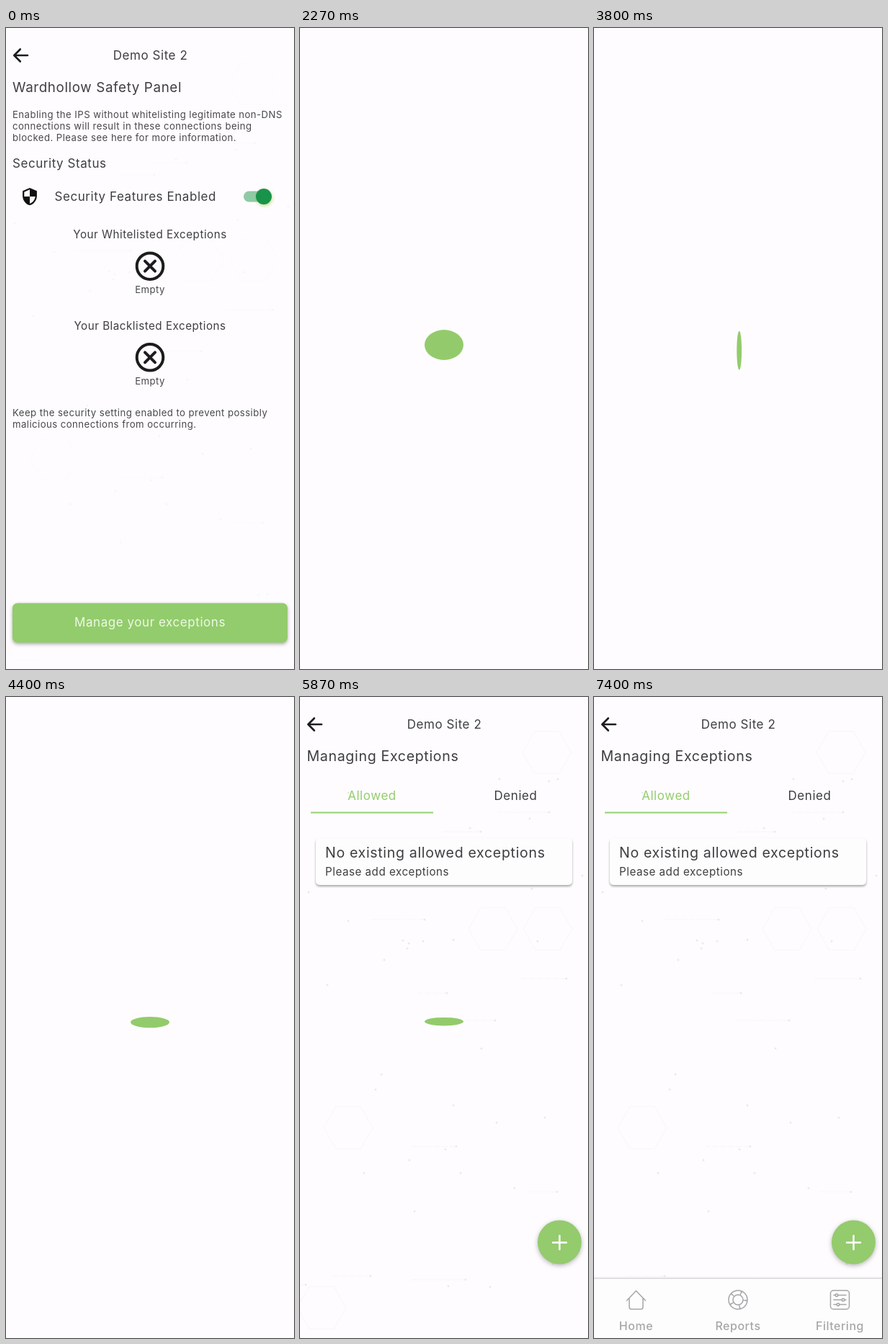
An HTML page that plays this animation: 400 px wide and 890 px high, repeating every 8000 ms.

```html
<!DOCTYPE html>
<html lang="en">
<head>
<meta charset="utf-8">
<title>Exceptions</title>
<style>
  html, body { margin: 0; width: 100%; height: 100%; overflow: hidden; background: #fefcfe; }
  svg { display: block; width: 100%; height: 100%; }
  text { font-family: Inter, "Open Sans", sans-serif; font-size: 17px; letter-spacing: .033em; fill: #3e3e40; }
  .mid { text-anchor: middle; }
  .line { fill: none; stroke-linecap: round; stroke-linejoin: round; }
  .note { font-size: 13.2px; fill: #48484a; }
  .label { font-size: 15.2px; }
  .head { font-size: 19.6px; }
  #button { filter: drop-shadow(0 2px 2.5px rgba(0, 0, 0, .32)); }
  #card { filter: drop-shadow(0 2px 1.8px rgba(0, 0, 0, .34)); }
  #add { filter: drop-shadow(0 2px 3px rgba(0, 0, 0, .28)); }
  #thumb { filter: drop-shadow(1px 2px 2px rgba(150, 190, 40, .5)); }
  #nav { filter: drop-shadow(0 -1px 1.5px rgba(0, 0, 0, .22)); }
  #nav text { font-size: 16px; font-weight: 500; fill: #a6a6a8; }
</style>
</head>
<body>
<svg viewBox="0 0 400 890" preserveAspectRatio="none">
  <defs>
    <g id="top">
      <path class="line" d="M30 38H11.500M19.800 29.500L11.300 38L19.800 46.500" stroke="#1c1c1e" stroke-width="2.600"/>
      <text class="mid" x="200.500" y="43.500">Demo Site 2</text>
    </g>
    <g id="none">
      <g class="line" stroke="#1c1c1c" stroke-width="4">
        <circle r="18.300"/>
        <path d="M-7-7L7 7M7-7L-7 7"/>
      </g>
      <text class="mid note" y="37.500">Empty</text>
    </g>
  </defs>

  <rect width="400" height="890" fill="#fefcfe"/>
  <g id="bg"></g>

  <g id="page1">
    <use href="#top"/>
    <text x="9" y="89" style="font-size:18.800px">Wardhollow Safety Panel</text>
    <text class="note" x="9" y="125">Enabling the IPS without whitelisting legitimate non-DNS</text>
    <text class="note" x="9" y="141">connections will result in these connections being</text>
    <text class="note" x="9" y="157">blocked. Please see here for more information.</text>
    <text x="9" y="194">Security Status</text>
    <path transform="translate(19.800 220.800) scale(1.100)" fill="#111" d="M12 1L3 5v6c0 5.550 3.840 10.740 9 12 5.160-1.260 9-6.450 9-12V5zM12 12h7c-.53 4.120-3.280 7.790-7 8.940V12H5V6.300l7-3.110z"/>
    <text x="67.500" y="240">Security Features Enabled</text>
    <rect x="330" y="226.500" width="36" height="15" rx="7.500" fill="#8fcaa4"/>
    <circle id="thumb" cx="358" cy="234" r="11" fill="#19934b"/>

    <text class="mid label" x="200" y="292.300">Your Whitelisted Exceptions</text>
    <use href="#none" x="200" y="330.700"/>
    <text class="mid label" x="200" y="419">Your Blacklisted Exceptions</text>
    <use href="#none" x="200" y="457.300"/>

    <text class="note" x="9" y="539.300">Keep the security setting enabled to prevent possibly</text>
    <text class="note" x="9" y="555.300">malicious connections from occurring.</text>
    <rect id="button" x="9" y="798.500" width="382" height="55" rx="7" fill="#93cc6c"/>
    <text class="mid" x="200" y="831" style="fill:#eef8e6">Manage your exceptions</text>
  </g>

  <g id="page2">
    <use href="#top"/>
    <text class="head" x="9.500" y="89.300">Managing Exceptions</text>
    <text class="mid" x="100" y="143" style="fill:#94cd6e">Allowed</text>
    <text class="mid" x="299.500" y="143">Denied</text>
    <rect x="15" y="159.500" width="170" height="2" fill="#94cf72"/>
    <rect id="card" x="22" y="196" width="356" height="65" rx="5" fill="#fefdfe"/>
    <text class="head" x="35" y="223.300">No existing allowed exceptions</text>
    <text class="label" x="35" y="247.700">Please add exceptions</text>
    <circle id="add" cx="360.500" cy="757" r="30.500" fill="#94cb6d"/>
    <path class="line" d="M351 757.500h19M360.500 748v19" stroke="#fff" stroke-width="2.500"/>
  </g>

  <ellipse id="spin" fill="#93cb6c"/>

  <g id="nav">
    <rect x="-10" y="808" width="420" height="100" fill="#fefdfe"/>
    <g class="line" stroke="#a6a6a8" stroke-width="1.500">
      <path d="M45.500 838L58.500 824.500L71.500 838M49 835v12q0 3 3 3h13q3 0 3-3v-12"/>
      <circle cx="200" cy="837" r="13"/>
      <circle cx="200" cy="837" r="7"/>
      <circle cx="200" cy="837" r="10" stroke-width="6" stroke-linecap="butt" stroke-dasharray="1.500 11.066"/>
      <rect x="328.500" y="824" width="26" height="26" rx="4"/>
      <path d="M333 830.500h17M333 837h17M333 843.500h17"/>
      <g fill="#fefdfe">
        <circle cx="337" cy="830.500" r="1.800"/>
        <circle cx="346" cy="837" r="1.800"/>
        <circle cx="339" cy="843.500" r="1.800"/>
      </g>
    </g>
    <text class="mid" x="58.500" y="878.500">Home</text>
    <text class="mid" x="200" y="878.500">Reports</text>
    <text class="mid" x="341.500" y="878.500">Filtering</text>
  </g>
</svg>

<script>
const LOOP = 8000;
const LEAVE = 1870, ENTER = 5600, SPIN_START = 1930, SPIN_END = 6130, NAV_IN = 6300;
const $ = id => document.getElementById(id);
const clamp = x => Math.max(0, Math.min(1, x));
const ramp = (t, from, span) => clamp((t - from) / span);
const smooth = x => x * x * (3 - 2 * x);

// Faint circuit pattern: hexagons, and nodes of which some end a trace
let seed = 7;
const rand = () => (seed = (seed * 16807) % 2147483647) / 2147483647;

function hexPath([x, y]) {
  const pts = Array.from({ length: 6 }, (_, i) => {
    const a = i * Math.PI / 3;
    return `${x + 34 * Math.cos(a)} ${y + 34 * Math.sin(a)}`;
  });
  return `M${pts.join("L")}Z`;
}

function drawPattern() {
  const hexes = [[343, 77], [268, 322], [344, 322], [67, 598], [30, 848]];
  let traces = "", nodes = "";
  for (let i = 0; i < 46; i++) {
    const x = Math.round(8 + 385 * rand()), y = Math.round(70 + 810 * rand());
    nodes += `<circle cx="${x}" cy="${y}" r="1.5" fill="#eae9ec"/>`;
    if (i % 4 === 0) traces += `M${x} ${y}h${Math.round(-30 - 50 * rand())}`;
  }
  $("bg").innerHTML =
    `<path d="${hexes.map(hexPath).join("")}" fill="none" stroke="#f8f7f9" stroke-width="1.2"/>` +
    `<path d="${traces}" stroke="#f6f5f7" stroke-dasharray="9 2"/>` + nodes;
}

// Loader: turns made at time t, slowing down steadily
function turnAt(t) {
  const s = (t - 2270) / 1000;
  return 1.1685 + 1.172 * s - .0865 * s * s;
}

// A disc flips about its x axis, then its y axis, seen in perspective
function drawSpin(t) {
  const R = 27, depth = .5, cx = 200, cy = 447.8;
  const half = (turnAt(t) % 1) * 2;
  const a = Math.PI * smooth(half % 1);
  const c = Math.cos(a), s = Math.sin(a), d = 1 - (depth * s) ** 2;
  const thin = R * Math.abs(c) / d, shift = -R * c * s * depth / d;
  const tall = half >= 1;
  const set = { cx: cx + (tall ? shift : 0), cy: cy + (tall ? 0 : shift), rx: tall ? thin : R, ry: tall ? R : thin };
  for (const k in set) $("spin").setAttribute(k, set[k].toFixed(2));
}

function draw(t) {
  const out = 1 - ramp(t, LEAVE, 130);
  const enter = ramp(t, ENTER, 130);
  $("page1").style.opacity = out;
  $("page2").style.opacity = enter;
  $("bg").style.opacity = t < ENTER ? out * (.35 + .65 * ramp(t, 0, 1200)) : enter;

  const spinning = t >= SPIN_START && t < SPIN_END;
  $("spin").style.display = spinning ? "" : "none";
  if (spinning) drawSpin(t);

  const rise = 1 - (1 - ramp(t, NAV_IN, 300)) ** 3;
  $("nav").style.display = rise > 0 ? "" : "none";
  $("nav").setAttribute("transform", `translate(0 ${(84 * (1 - rise)).toFixed(2)})`);
}

drawPattern();
const start = performance.now();
function tick() {
  draw((performance.now() - start) % LOOP);
  requestAnimationFrame(tick);
}
draw(0);
requestAnimationFrame(tick);
</script>
</body>
</html>
```
